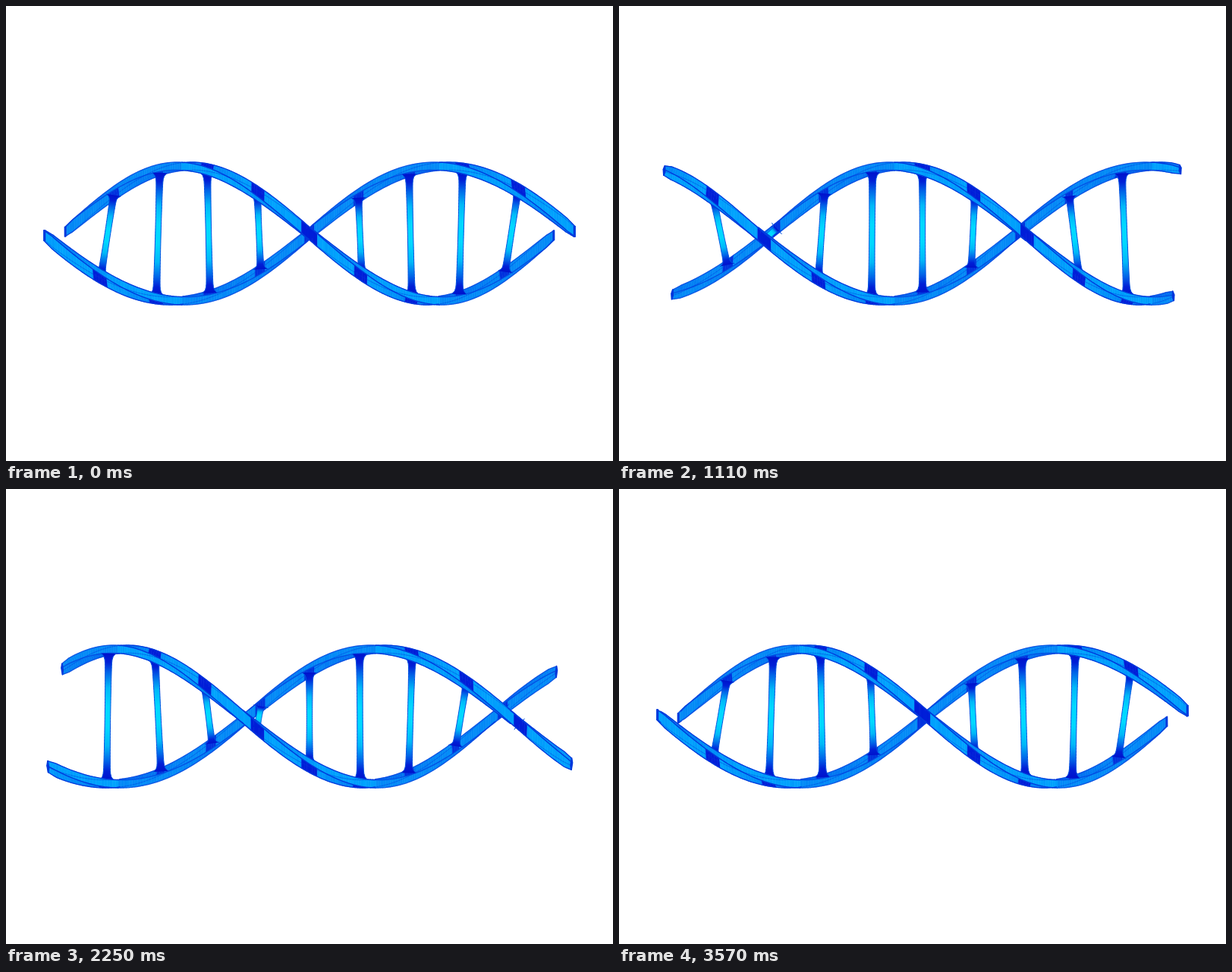
Recreate the animation shown at these times as an HTML page with a canvas. Size 800 by 600 pixels, loop 3.6 s.

```html
<!DOCTYPE html>
<html lang="en">
<head>
<meta charset="utf-8">
<title>Turning double helix</title>
<style>
  html, body { margin: 0; width: 100%; height: 100%; overflow: hidden; background: #fff; }
  canvas { display: block; }
</style>
</head>
<body>
<canvas id="stage" width="800" height="600"></canvas>
<script>
const ctx = document.getElementById('stage').getContext('2d');
const LOOP = 3600, STEP = 30;
const HALF = 335, HALF_TURN = 338, CAMERA = 2160;
const RADIUS = 88.4, THICK = 5.2, WIDE = 8.2;
const SEGMENTS = 200, RUNG_GAP = 66.5;
const EDGE = '#0038dc', JOINT = [0, 30, 216];

const mix = (a, b, k) => a.map((v, i) => v + (b[i] - v) * k);
const rgb = c => `rgb(${c.map(Math.round).join(',')})`;
const along = i => -HALF + 2 * HALF * i / SEGMENTS;

function project(x, y, z) {
  const s = CAMERA / (CAMERA - z);
  return [400 + x * s, 300 + y * s];
}

function trace(points) {
  ctx.beginPath();
  points.forEach(p => ctx.lineTo(p[0], p[1]));
}

// Four corners of the bar: outer +, outer -, inner -, inner +
function section(i, turn) {
  const x = along(i);
  const angle = Math.PI * x / HALF_TURN + turn;
  const sin = Math.sin(angle), cos = Math.cos(angle);
  const taper = 0.78 + 0.22 * Math.min(1, Math.min(i, SEGMENTS - i) / 3);
  const corners = [[1, 1], [1, -1], [-1, -1], [-1, 1]].map(([a, b]) => {
    const r = RADIUS + a * THICK * taper, w = b * WIDE * taper;
    return project(x, r * sin + w * cos, r * cos - w * sin);
  });
  return { sin, cos, corners };
}

function faceColor(i, side, facing, front) {
  const x = along(i + 0.5);
  const rung = Math.round(x / RUNG_GAP);
  const nearRung = Math.abs(x - rung * RUNG_GAP) < (front ? 8.5 : 6.5);
  if (!side && nearRung && Math.abs(rung) < 5) return front ? JOINT : [0, 50, 222];
  const bright = front ? [0, 160, 252] : [4, 138, 246];
  const grain = 0.06 * Math.sin(i * 1.7) * Math.sin(i * 0.61);
  return mix([0, 76, 232], bright, Math.min(1, 0.35 + 0.85 * facing) + grain);
}

function drawStrand(ring, front) {
  for (let i = 0; i < SEGMENTS; i++) {
    const a = ring[i], b = ring[i + 1];
    if (a.cos >= 0 !== front) continue;
    const radial = a.cos >= 0 ? 0 : 2;
    const tangent = a.sin < 0 ? 3 : 1;
    for (const face of [radial, tangent]) {
      const next = (face + 1) % 4, side = face === tangent;
      trace([a.corners[face], a.corners[next], b.corners[next], b.corners[face]]);
      ctx.closePath();
      ctx.fillStyle = ctx.strokeStyle =
        rgb(faceColor(i, side, Math.abs(side ? a.sin : a.cos), front));
      ctx.lineWidth = 0.6;
      ctx.fill();
      ctx.stroke();
    }
  }
  // Edges hidden behind the bar shimmer through the glass
  ctx.strokeStyle = EDGE;
  for (let c = 0; c < 4; c++) {
    for (const seen of [false, true]) {
      ctx.beginPath();
      for (let i = 0; i < SEGMENTS; i++) {
        const a = ring[i];
        if (a.cos >= 0 !== front) continue;
        const hidden = c === (a.cos >= 0 ? (a.sin < 0 ? 2 : 3) : (a.sin < 0 ? 1 : 0));
        if (hidden === seen) continue;
        ctx.moveTo(...a.corners[c]);
        ctx.lineTo(...ring[i + 1].corners[c]);
      }
      ctx.globalAlpha = seen ? (front ? 1 : 0.7) : 0.4;
      ctx.lineWidth = seen ? 1.3 : 1;
      ctx.stroke();
    }
  }
  ctx.globalAlpha = 1;
  for (const end of [ring[0], ring[SEGMENTS]]) {
    if (end.cos >= 0 !== front) continue;
    trace(end.corners);
    ctx.closePath();
    ctx.fillStyle = rgb(JOINT);
    ctx.fill();
    ctx.lineWidth = 1.8;
    ctx.stroke();
  }
}

function drawRung(x, turn) {
  const angle = Math.PI * x / HALF_TURN + turn;
  const r = RADIUS - THICK + 1;
  const sin = r * Math.sin(angle), cos = r * Math.cos(angle);
  const from = project(x, -sin, -cos), to = project(x, sin, cos);
  const dx = to[0] - from[0], dy = to[1] - from[1], length = Math.hypot(dx, dy);
  if (length < 20) return;

  const left = [], right = [];
  for (let k = 0; k <= 40; k++) {
    const u = k / 20 - 1, m = Math.abs(u);
    const half = 3.7 + 0.9 * m * m + 5 * m ** 22;
    const cx = from[0] + dx * k / 40, cy = from[1] + dy * k / 40;
    const nx = -dy / length * half, ny = dx / length * half;
    left.push([cx + nx, cy + ny]);
    right.unshift([cx - nx, cy - ny]);
  }
  const shade = ctx.createLinearGradient(...from, ...to);
  [[0, '#0012cc'], [0.07, '#0020d6'], [0.15, '#0064e8'], [0.27, '#00b8f8'], [0.42, '#00d8ff']]
    .forEach(([at, color]) => {
      shade.addColorStop(at, color);
      shade.addColorStop(1 - at, color);
    });
  trace([...left, ...right]);
  ctx.fillStyle = shade;
  ctx.fill();
  ctx.strokeStyle = '#0050e0';
  ctx.lineWidth = 1;
  for (const edge of [left, right]) {
    trace(edge);
    ctx.stroke();
  }
}

function draw(now) {
  const time = Math.floor(now % LOOP / STEP) * STEP;
  const turn = 2 * Math.PI * time / LOOP;
  const rings = [turn, turn + Math.PI].map(offset =>
    Array.from({ length: SEGMENTS + 1 }, (_, i) => section(i, offset)));

  ctx.fillStyle = '#fff';
  ctx.fillRect(0, 0, 800, 600);
  ctx.lineJoin = ctx.lineCap = 'round';
  rings.forEach(ring => drawStrand(ring, false));
  for (let k = -4; k <= 4; k++) drawRung(k * RUNG_GAP, turn);
  rings.forEach(ring => drawStrand(ring, true));
}

function tick() {
  draw(performance.now());
  requestAnimationFrame(tick);
}
tick();
</script>
</body>
</html>
```
